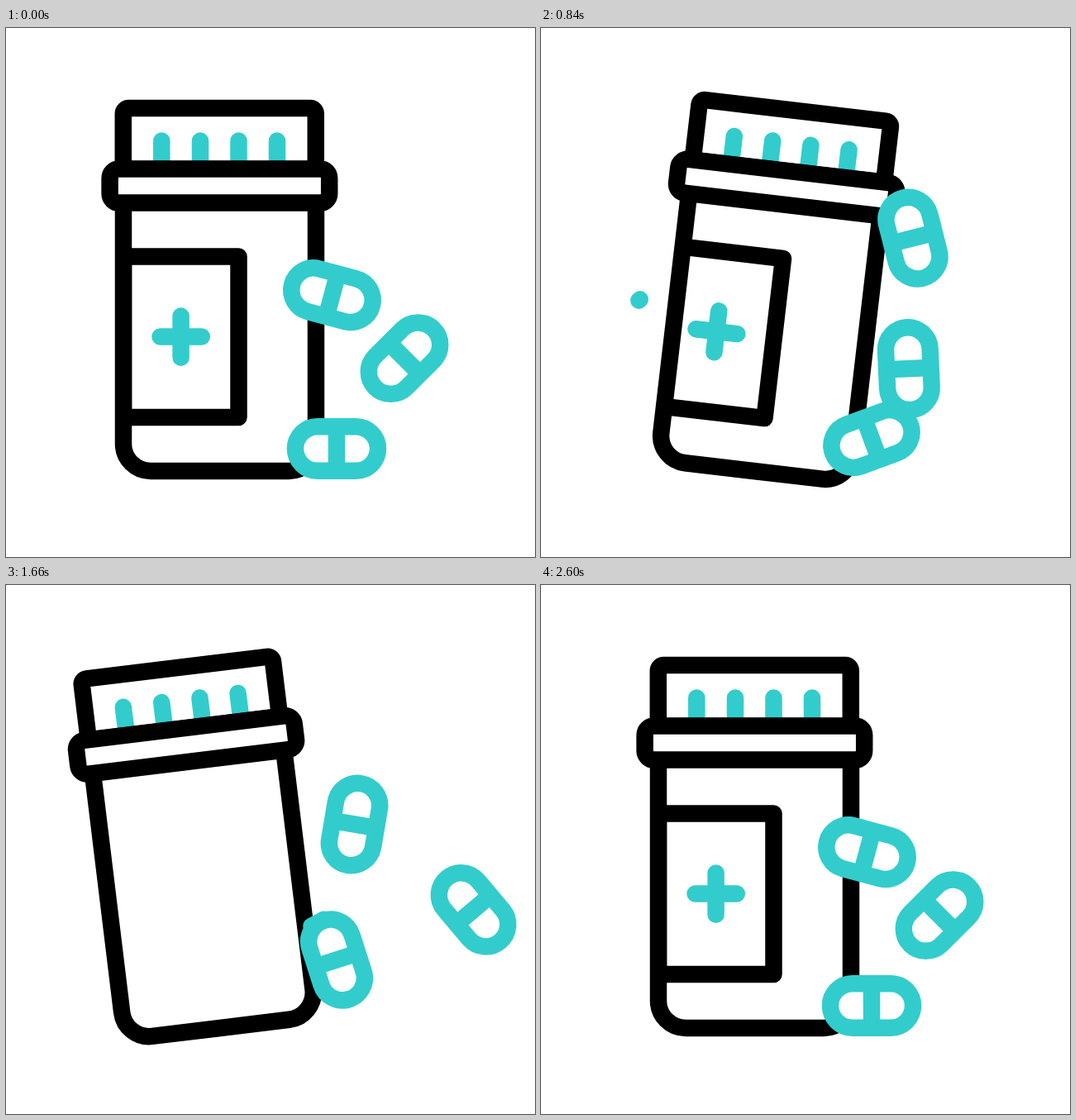
Write an HTML page that moves like this. It is 640 px wide and 640 px high and loops after 3000 ms.

```html
<!DOCTYPE html>
<html lang="en">
<head>
<meta charset="utf-8">
<title>Pill bottle</title>
<style>
html, body { margin: 0; width: 100%; height: 100%; overflow: hidden; background: #fff; }
svg { display: block; width: 100vw; height: 100vh; fill: none; stroke-width: 20.5; stroke: #000; stroke-linejoin: round; }
.teal { stroke: #33cccc; stroke-linecap: round; }
.pill { fill: #fff; stroke: #33cccc; }
</style>
</head>
<body>
<svg viewBox="0 0 640 640">
  <defs>
    <clipPath id="inside"><rect x="142" y="211" width="233" height="325"/></clipPath>
    <g id="pill">
      <rect x="-50" y="-26.8" width="100" height="53.6" rx="26.8"/>
      <path d="M0-26V26"/>
    </g>
  </defs>
  <g id="bottle">
    <path class="teal" d="M188.3 136.5V168M235 136.5V168M281.5 136.5V168M328 136.5V168"/>
    <g clip-path="url(#inside)">
      <g id="label">
        <rect x="142" y="276.5" width="139.5" height="194.5"/>
        <path class="teal" d="M186.5 373.5H236.8M211.6 348.5V398.8"/>
      </g>
    </g>
    <path d="M142 211V503a33 33 0 0 0 33 33H342a33 33 0 0 0 33-33V211"/>
    <rect x="141.8" y="97" width="233" height="74" rx="6.5"/>
    <rect x="125.6" y="170.6" width="265.6" height="41" rx="11" fill="#fff"/>
    <path id="swishA" class="teal"/>
    <path id="swishB" class="teal"/>
  </g>
  <use id="pillA" class="pill" href="#pill"/>
  <use id="pillB" class="pill" href="#pill"/>
  <use id="pillC" class="pill" href="#pill"/>
</svg>
<script>
const LOOP = 3000;
const el = id => document.getElementById(id);
const ease = u => u * u * (3 - 2 * u);

// Eases from pose to pose; each pose is [time, value].
const track = (...poses) => t => {
  const next = poses.findIndex(p => p[0] > t);
  if (next === 0) return poses[0][1];
  if (next < 0) return poses[poses.length - 1][1];
  const [t0, v0] = poses[next - 1], [t1, v1] = poses[next];
  return v0 + (v1 - v0) * ease((t - t0) / (t1 - t0));
};

const tilt = track([200, 0], [480, -7], [1080, 14], [1680, -7], [2280, 0]);

// The label leaves on the right and comes back on the left.
const slide = track([200, 0], [570, -71], [1690, 294], [1690, -150], [2600, 0]);

const aMove = track([200, 0], [1130, 115], [1250, 115], [2020, -15.5], [2450, 0]);
const aTurn = track([220, 15], [1430, 132], [1500, 132], [2020, -10], [2500, 15]);

const bPath = (rest, left, right) =>
  track([345, rest], [890, left], [1440, right], [1730, right], [2430, rest]);
const bX = bPath(482, 444, 565.6);
const bY = bPath(399.6, 412.4, 392.9);
const bTurn = track([390, -45], [910, -95], [1830, 64], [1950, 64], [2500, -45]);

const cY = track([200, 509], [530, 533.6], [1190, 453.5], [1660, 453.5], [2090, 532], [2500, 509]);
const cTurn = track([200, 0], [600, -16], [720, -16], [1650, -108], [2020, 0]);

// Strokes that sweep round the bottle from one angle to another.
const swishes = [
  { node: el('swishA'), cy: 357, head: track([790, -14], [1680, 190]), tail: track([1065, -14], [1650, 190]) },
  { node: el('swishB'), cy: 396, head: track([900, 40], [1500, 148]), tail: track([980, 40], [1810, 148]) }
];

function drawSwish({ node, cy, head, tail }, t) {
  const from = tail(t), to = head(t);
  const at = deg => {
    const a = deg * Math.PI / 180;
    return `${258 - 165 * Math.cos(a)} ${cy + 47 * Math.sin(a)}`;
  };
  const big = to - from > 180 ? 1 : 0;
  node.setAttribute('d', to - from > 0.5 ? `M${at(from)}A165 47 0 ${big} 0 ${at(to)}` : '');
}

function place(id, x, y, turn) {
  el(id).setAttribute('transform', `translate(${x} ${y}) rotate(${turn})`);
}

function draw(t) {
  el('bottle').setAttribute('transform', `rotate(${tilt(t)} 258 525)`);
  el('label').setAttribute('transform', `translate(${slide(t)} 0)`);
  swishes.forEach(s => drawSwish(s, t));
  const a = aMove(t);
  place('pillA', 394.5 + a * 0.626, 323.2 - a * 0.78, aTurn(t));
  place('pillB', bX(t), bY(t), bTurn(t));
  place('pillC', 400, cY(t), cTurn(t));
}

const start = performance.now();
function frame() {
  draw((performance.now() - start) % LOOP);
  requestAnimationFrame(frame);
}
frame();
</script>
</body>
</html>
```
